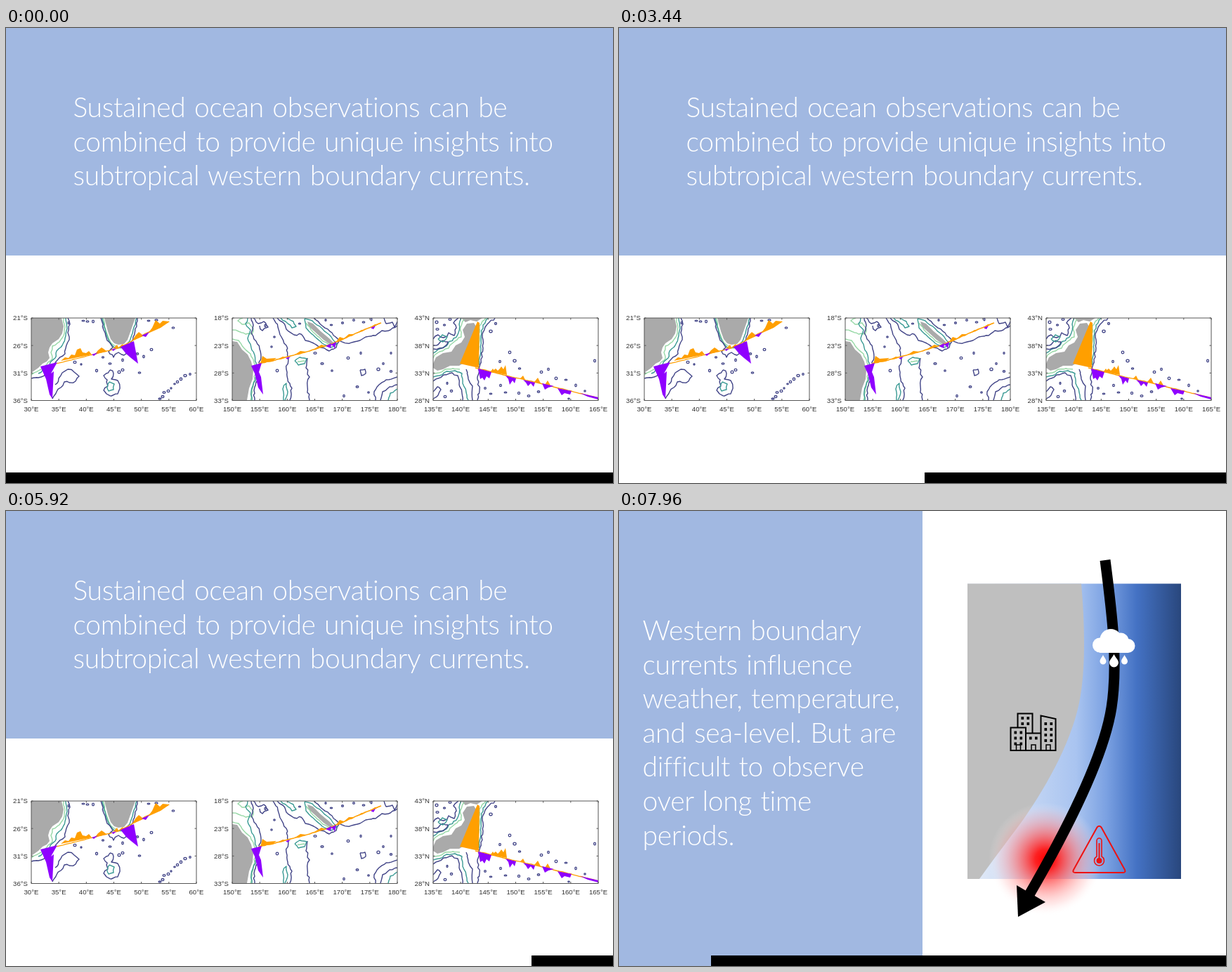
Animation, 864 px wide and 648 px high, one loop 8 s. Source, as an HTML page:

```html
<!DOCTYPE html>
<html lang="en">
<head>
<meta charset="utf-8">
<title>Western boundary currents</title>
<style>
html, body { margin: 0; width: 100%; height: 100%; overflow: hidden; background: #fff; }
svg { display: block; width: 100vw; height: 100vh; }
.copy { font: 300 39px Lato, sans-serif; fill: #fff; letter-spacing: -.3px; word-spacing: 2.2px; }
.axis { font: 9.6px "Liberation Sans", Arial, sans-serif; fill: #333; }
</style>
</head>
<body>
<svg id="stage" viewBox="0 0 864 648">
  <defs>
    <linearGradient id="sea" gradientUnits="userSpaceOnUse" x1="513" x2="800">
      <stop offset="0" stop-color="#dfe8f7"/>
      <stop offset=".48" stop-color="#a9c4f0"/>
      <stop offset=".63" stop-color="#7ba1e2"/>
      <stop offset=".78" stop-color="#4472c4"/>
      <stop offset="1" stop-color="#29477d"/>
    </linearGradient>
    <radialGradient id="heat">
      <stop offset="0" stop-color="#f00"/>
      <stop offset=".18" stop-color="#ff1c1c" stop-opacity=".97"/>
      <stop offset=".5" stop-color="#ff7070" stop-opacity=".65"/>
      <stop offset=".8" stop-color="#ffb8b8" stop-opacity=".3"/>
      <stop offset="1" stop-color="#fff" stop-opacity="0"/>
    </radialGradient>
  </defs>

  <g id="intro">
    <rect width="864" height="648" fill="#fff"/>
    <rect width="864" height="324" fill="#a1b8e1"/>
  </g>

  <g id="impact">
    <rect width="864" height="648" fill="#fff"/>
    <rect width="432" height="648" fill="#a1b8e1"/>
    <rect x="496" y="103.5" width="304" height="420.5" fill="url(#sea)"/>
    <path fill="#bfbfbf" d="M496 103.5H658C663 160 664 220 657 262C648 322 610 390 575 440C553 470 530 500 513 524H496Z"/>
    <circle cx="607" cy="496" r="81" fill="url(#heat)"/>
    <path fill="none" stroke="#000" stroke-width="15" d="M692 70C701 140 711 215 701 280C690 350 640 450 583 548"/>
    <path d="M568 578L566 533L607 557Z"/>
    <g fill="#fff">
      <circle cx="684.5" cy="191" r="10.5"/>
      <circle cx="700" cy="183.5" r="15.5"/>
      <circle cx="714" cy="185" r="11.5"/>
      <circle cx="724.5" cy="192" r="10"/>
      <rect x="684" y="186" width="41" height="16"/>
      <path id="drop" d="M704.5 204C707 209 711 212 711 216A6.5 6.5 0 0 1 698 216C698 212 702 209 704.5 204Z"/>
      <path id="dropL" d="M689 205C691 209 693.5 211 693.5 214A4.5 4.5 0 0 1 684.5 214C684.5 211 687 209 689 205Z"/>
      <use href="#dropL" x="30.5"/>
    </g>
    <g fill="none" stroke="#000" stroke-width="2">
      <path d="M557.5 341V308.500H579V341M567.500 308V288.500H588.500V316M600.500 341V291.500L621.500 296V341M579 316.500H600M556.500 341H622.500"/>
      <path d="M565.500 341V333H571.500V341M587 341V333H593V341M608 341V333H614V341" stroke-width="1.500"/>
    </g>
    <g id="windows"></g>
    <g fill="none" stroke="#ee1111" stroke-width="2" stroke-linejoin="round">
      <path d="M680.500 450.500Q683.500 447 686.500 450.500L720 511Q721.500 515 717.500 515H649.500Q645 515 647 511Z"/>
      <path d="M680 492V469.500A3.500 3.500 0 0 1 687 469.500V492A7 7 0 1 1 680 492Z" stroke-width="1.600"/>
      <path d="M683.500 473V497"/>
      <circle cx="683.500" cy="498" r="3" fill="#ee1111"/>
    </g>
  </g>
  <rect id="bar" y="633" height="15" width="864"/>
</svg>
<script>
const $ = id => document.getElementById(id);
const add = (parent, tag, attrs, text) => {
  const el = document.createElementNS('http://www.w3.org/2000/svg', tag);
  for (const k in attrs) el.setAttribute(k, attrs[k]);
  if (text) el.textContent = text;
  return parent.appendChild(el);
};

let seed = 7;
const rand = () => (seed = seed * 16807 % 2147483647) / 2147483647;
const jitter = amp => (rand() - .5) * 2 * amp;

const NAVY = '#414487', TEAL = '#3a9a94', MINT = '#97d8a6';
const LAND = '#aaa', ORANGE = '#ff9f00', VIOLET = '#8f00ff';

const copy = (parent, x, y, lines) => lines.forEach((line, i) =>
  add(parent, 'text', { x, y: y + i * 48.6, class: 'copy' }, line));

const parse = s => s.split(' ').map(p => p.split(',').map(Number));

// Polyline broken into short, slightly ragged pieces.
function rough(points, amp) {
  const out = [points[0]];
  for (let i = 1; i < points.length; i++) {
    const [ax, ay] = points[i - 1], [bx, by] = points[i];
    const n = Math.max(1, Math.round(Math.hypot(bx - ax, by - ay) / 4));
    for (let k = 1; k <= n; k++) {
      const u = k / n, a = k < n ? amp : 0;
      out.push([ax + (bx - ax) * u + jitter(a), ay + (by - ay) * u + jitter(a)]);
    }
  }
  return out.map(p => p[0].toFixed(1) + ',' + p[1].toFixed(1)).join(' ');
}

const line = (g, color, s, amp = 1, width = 1.4) => add(g, 'polyline',
  { points: rough(parse(s), amp), fill: 'none', stroke: color, 'stroke-width': width, 'stroke-linejoin': 'round' });
const fill = (g, color, ...shapes) => shapes.forEach(points => add(g, 'polygon', { points, fill: color }));
const islets = (g, s, color = NAVY) => parse(s).forEach(([x, y]) => add(g, 'ellipse',
  { cx: x, cy: y, rx: 1 + rand() * 1.1, ry: .8 + rand() * 1.1, fill: '#fff', stroke: color, 'stroke-width': 1.3 }));

function chart(x, lon, lats, draw) {
  const y = 413, w = 235, h = 117.5, root = $('intro'), id = 'clip' + x;
  add(add(root, 'clipPath', { id }), 'rect', { x, y, width: w, height: h });
  draw(add(root, 'g', { 'clip-path': `url(#${id})` }));
  let ticks = '';
  for (let i = 0; i < 7; i++) {
    const tx = x + w * i / 6;
    ticks += `M${tx} ${y}v2.500M${tx} ${y + h}v-2.500`;
    add(root, 'text', { x: tx, y: 545.5, class: 'axis', 'text-anchor': 'middle' }, lon + i * 5 + '°E');
  }
  lats.forEach((label, i) => {
    const ty = y + h * i / 3;
    ticks += `M${x} ${ty}h2.500M${x + w} ${ty}h-2.500`;
    add(root, 'text', { x: x - 5, y: ty + 3.4, class: 'axis', 'text-anchor': 'end' }, label);
  });
  add(root, 'path', { d: `M${x} ${y}h${w}v${h}h${-w}z` + ticks, fill: 'none', stroke: '#555', 'stroke-width': 1 });
}

chart(36, 30, ['21°S', '26°S', '31°S', '36°S'], g => {
  fill(g, LAND, '36,413 79,413 82,425 80,435 75,443 66,449 62,455 60,462 62,470 58,475 52,478 46,484 36,491',
    '140,413 145,432 149,443 154,449 160,451 168,450 173,444 178,430 184,413');
  line(g, MINT, '82,413 84,426 82,438 76,447 66,453 64,462 66,471 58,479 48,487 36,494');
  line(g, TEAL, '85,413 87,428 84,442 80,452 72,460 70,470 58,483 46,492');
  line(g, NAVY, '88,413 91,422 88,434 90,444 85,456 84,464 74,472 66,482 58,490 50,497 36,499');
  line(g, NAVY, '66,528 72,518 78,512 83,504 90,505 99,503 104,496 97,490 88,486 80,491 75,499 70,508', 1.6);
  line(g, MINT, '138,413 144,436 150,449 158,454');
  line(g, TEAL, '137,413 142,433 147,447 154,455 168,455 176,446 181,430 186,413', .7);
  line(g, NAVY, '135,413 139,430 144,445 152,455 146,461 153,469 160,462 168,466 174,458 181,440 186,425 187,413', 1.2);
  line(g, NAVY, '148,487 153,492 150,500 159,502 162,511 159,521 150,524 143,521 139,516 145,510 144,501 139,495 148,487', 1.6);
  line(g, TEAL, '147,504 154,507 153,515 146,517 144,511 147,504', 1);
  islets(g, '89,420 110,417 116,418 124,418 203,417 214,416 187,464 107,479 207,458 196,468 148,478 138,469 166,473 98,476 129,488 166,487 161,490 190,491 238,427');
  islets(g, '219,528 223,525 225,519 231,517 235,513 240,507 244,504 249,500 255,495 262,493');
  line(g, ORANGE, '72,478 120,466 160,456 195,437 232,418', .3, 1.2);
  fill(g, ORANGE, '78,474 84,469 89,470 93,465 98,466 101,458 106,456 109,462 114,463 118,460 122,465',
    '127,464 131,459 136,455 139,457 144,461', '152,457 158,451 160,455 166,450 168,454',
    '179,446 185,437 189,433 193,436 195,439', '202,435 208,427 213,416 219,421 223,417 233,418 220,427');
  fill(g, VIOLET, '49,482 73,476 64,492 68,489 66,528 62,522 57,500', '163,454 182,446 188,478 178,470 171,464',
    '193,438 204,433 199,440', '122,465 131,462 125,467', '150,458 157,456 153,460');
});

chart(322, 150, ['18°S', '23°S', '28°S', '33°S'], g => {
  fill(g, LAND, '322,446 329,447 336,458 344,465 349,475 352,487 351,500 346,513 343,530 322,530',
    '429,418 437,421 448,432 460,442 468,450 462,451 452,444 440,433 431,425');
  line(g, MINT, '322,430 331,432 341,436 350,436 352,428 346,420 336,422 330,417 337,413');
  line(g, MINT, '322,443 331,445 339,456 348,464 353,476 355,490 352,508 348,530');
  line(g, TEAL, '344,413 341,421 348,430 344,442 349,455 354,466 357,482 355,502 349,518 350,530');
  line(g, NAVY, '349,413 352,423 349,434 356,446 361,457 363,468 359,484 358,502 353,516 354,530', 1.2);
  line(g, NAVY, '352,413 359,421 367,418 373,426 365,431 361,424', 1.3);
  line(g, NAVY, '380,413 387,426 392,440 399,452 402,470 399,486 401,500 407,513 404,530', 1.2);
  line(g, TEAL, '397,530 401,518 399,506 394,514 395,530', 1);
  line(g, NAVY, '429,470 427,484 432,497 429,510 432,530', 1.4);
  line(g, NAVY, '386,413 394,419 399,429 410,437 420,436 426,445 438,449 448,455 460,460 470,455 474,446 464,434 450,424 438,413', 1.2);
  line(g, TEAL, '391,413 398,418 407,427 413,425 409,418 400,413', 1);
  line(g, TEAL, '425,414 436,417 450,428 463,440 471,450 462,455 450,449 437,437 427,427 425,414', .7);
  line(g, MINT, '427,420 437,433 451,446 463,453', .6);
  line(g, TEAL, '411,474 418,469 428,471 425,478 416,480 411,474', 1.2);
  line(g, MINT, '415,475 425,474', 1);
  line(g, NAVY, '472,445 486,449 500,446 512,440 526,438 535,431 547,430 557,424', 1.2);
  line(g, NAVY, '538,413 541,421 550,419 553,426 557,418', 1.2);
  line(g, NAVY, '504,487 511,486 512,492 506,495 504,487', 1);
  line(g, NAVY, '526,530 524,518 531,508 541,501 557,497', 1.2);
  line(g, NAVY, '533,530 536,518 546,511 557,508', 1.2);
  line(g, TEAL, '544,530 547,520 557,514', 1);
  islets(g, '382,440 378,454 386,488 369,424 418,421 455,416 463,423 479,420 495,416 509,419 520,415 487,470 450,478 464,488 505,463 530,486 537,478 548,489 481,524 500,511 548,463 516,519 440,463');
  line(g, ORANGE, '360,478 383,473 425,462 466,449 500,434 534,420', .4, 1.5);
  fill(g, ORANGE, '362,478 365,467 371,471 385,470 380,474', '386,472 394,468 399,469', '410,466 419,460 428,461',
    '437,458 449,451 455,453', '469,448 475,440 481,442 488,436 496,436', '498,435 506,430 514,429', '516,428 525,422 533,421');
  fill(g, VIOLET, '349,481 364,477 360,490 363,497 366,522 359,512 354,492', '455,453 463,449 462,456',
    '462,451 470,447 468,457 466,453', '398,470 405,468 401,472', '519,427 526,424 523,429');
});

chart(608, 135, ['43°N', '38°N', '33°N', '28°N'], g => {
  fill(g, LAND, '608,478 612,469 622,463 634,461 640,452 648,448 653,440 650,430 656,421 666,420 671,428 667,440 660,460 655,475 645,481 632,481 622,486 614,488 608,484',
    '648,413 678,413 670,418 661,416 654,419');
  line(g, MINT, '608,470 617,461 630,456 639,446 648,440 647,426 652,415', 1.3);
  line(g, TEAL, '608,463 620,456 629,450 637,442 644,434 645,422 648,413', 1.5);
  line(g, NAVY, '608,443 615,437 623,441 630,434 638,438 641,427 637,420 644,413', 1.6);
  line(g, NAVY, '608,452 615,451 622,445 629,447 625,453 617,456 608,457', 1.5);
  line(g, TEAL, '615,443 621,437 628,440 622,447 615,443', 1.2);
  line(g, MINT, '683,413 674,424 674,440 673,458 671,476');
  line(g, TEAL, '686,413 679,423 676,439 676,457 673,480', 1);
  line(g, NAVY, '696,413 688,419 682,426 678,440 679,456 676,472 673,486 671,500 674,516 671,530', 1.2);
  line(g, MINT, '608,492 617,491 626,486 636,485 646,486');
  line(g, TEAL, '608,497 617,495 627,489 639,488 649,492 650,506 655,519 658,530', 1);
  line(g, NAVY, '608,503 615,499 623,494 635,491 643,495 645,508 649,520 650,530', 1.3);
  line(g, NAVY, '655,486 658,500 664,510 664,530', 1.4);
  line(g, NAVY, '608,518 614,511 619,515 615,523 608,528', 1.4);
  islets(g, '613,419 624,423 632,415 614,429 690,432 697,421 628,506 634,517 625,525 682,513 690,521 704,509 711,519 731,485 724,474 730,520 744,524 758,518 762,490 772,486 783,499 797,501 811,509 824,517 717,462 801,528 838,474 703,475');
  line(g, ORANGE, '668,484 712,495 760,506 843,527', .3, 1.4);
  fill(g, ORANGE, '671,418 674,420 673,484 646,478', '691,490 697,485 700,488 703,485 705,482 708,486 711,480 713,494',
    '732,499 736,495 739,501', '752,504 757,498 761,506', '767,508 771,502 775,509', '690,489 693,485 696,490');
  fill(g, VIOLET, '672,485 691,490 688,499 684,496 681,502 678,498 675,500', '711,495 726,499 724,506 721,502 717,508 715,500',
    '736,501 753,505 751,511 747,506 743,510 740,505', '763,506 780,510 772,512 767,515',
    '785,513 805,517 803,522 795,520 791,523', '817,520 843,526 843,529 828,525');
});

copy($('intro'), 95.5, 127, ['Sustained ocean observations can be',
  'combined to provide unique insights into', 'subtropical western boundary currents.']);
copy($('impact'), 33.5, 184, ['Western boundary', 'currents influence', 'weather, temperature,',
  'and sea-level. But are', 'difficult to observe', 'over long time', 'periods.']);

function panes(x, y, rows, dx) {
  for (let r = 0; r < rows; r++) for (let c = 0; c < 2; c++)
    add($('windows'), 'rect', { x: x + c * dx, y: y + r * 8, width: 3.6, height: 4 });
}
panes(562.5, 313.5, 3, 8);
panes(572.5, 293, 2, 8);
panes(605.5, 301, 4, 8);
panes(584, 321.500, 1, 8);

const STEP = 40, LOOP = 8000, SWITCH = 172;

function render(t) {
  const n = Math.floor(t % LOOP / STEP), first = n < SWITCH;
  const x = Math.round(first ? n * 864 / 171 : Math.max(0, n - SWITCH - 1) * 864 / 172);
  $('intro').style.display = first ? '' : 'none';
  $('impact').style.display = first ? 'none' : '';
  $('bar').setAttribute('x', x);
}

const start = performance.now();
function tick() {
  render(performance.now() - start);
  requestAnimationFrame(tick);
}
tick();
</script>
</body>
</html>
```
